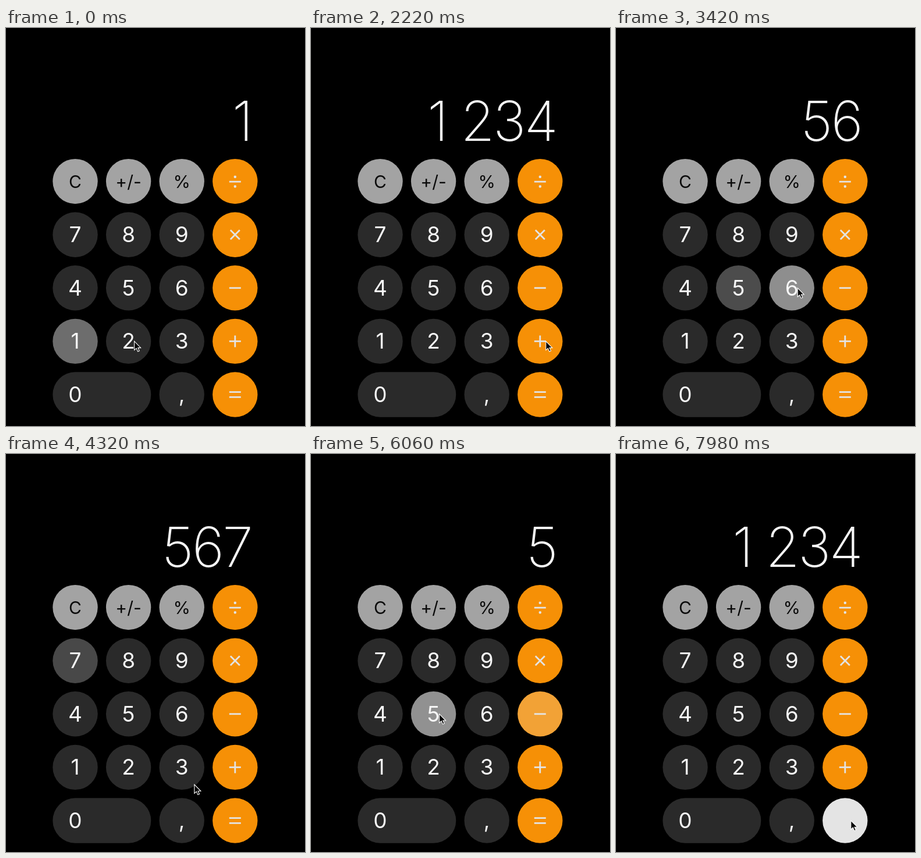
Animation, 514 px wide and 684 px high, one loop 8 s. Source, as an HTML page:

```html
<!DOCTYPE html>
<html lang="en">
<head>
<meta charset="utf-8">
<title>Calculator</title>
<style>
  html, body { margin: 0; width: 100%; height: 100%; overflow: hidden; background: #000; }
  svg { display: block; width: 514px; height: 684px; }
  text { font-family: Inter, Roboto, sans-serif; text-anchor: middle; }
  .digit { font-size: 37px; fill: #f6f6f6; }
  .tool { font-size: 30px; fill: #0a0a0a; }
  .icon { fill: none; stroke: #e4e4e4; stroke-width: 2.8; stroke-linejoin: round; }
  #display { font-size: 95px; font-weight: 200; letter-spacing: -2.8px; text-anchor: end; fill: #f6f6f6; }
</style>
</head>
<body>
<svg viewBox="0 0 514 684">
  <rect width="514" height="684"/>
  <text id="display" x="422" y="193.5"></text>
  <g id="keys"></g>
  <path id="cursor" d="M0 0V15.2L3.5 12L6 17.6L8.6 16.5L6.2 11.2H11Z" fill="#000" stroke="#fff" stroke-width="1.1"/>
</svg>
<script>
const LOOP = 8000, STEP = 60;
const HOLD = 50, FADE = 700;                       // key glow, ms
const DWELL = 150, MS_PER_PX = 1.6, BOW = 20;      // pointer travel
const LEFT = 119, TOP = 263.6, PITCH = 91.6, R = 38.7;

const LAYOUT = [['C', '+/-', '%', '÷'], [...'789×'], [...'456−'], [...'123+'], ['0', '', ',', '=']];
const ICONS = {
  '÷': 'M-10 .5H10M-.7-8.5h1.4v1.4h-1.4zM-.7 8.1h1.4v1.4h-1.4z',
  '×': 'M-8-8L8 8M8-8L-8 8',
  '−': 'M-10 0H10',
  '+': 'M-10 0H10M0-10V10',
  '=': 'M-10-4.3H10M-10 4.3H10'
};
const STYLES = {
  tool: { base: [163, 163, 163], lit: [217, 217, 217] },
  digit: { base: [42, 42, 42], lit: [146, 146, 146] },
  icon: { base: [246, 144, 6], lit: [228, 228, 228] }
};

const TIMES = [-300, 150, 600, 1080, 2450, 2900, 3340, 3770, 4900, 5460, 6000, 6300, 6880, 7950];
const presses = [...'1234+567=−567='].map((label, i) => ({ label, time: TIMES[i] }));

const display = document.getElementById('display');
const cursor = document.getElementById('cursor');
const keyGroup = document.getElementById('keys');
const keys = {};

const mix = (a, b, k) => a + (b - a) * k;
const clamp = k => Math.min(1, Math.max(0, k));
const ease = k => k * k * (3 - 2 * k);

function add(tag, attributes) {
  const node = document.createElementNS('http://www.w3.org/2000/svg', tag);
  for (const name in attributes) node.setAttribute(name, attributes[name]);
  return keyGroup.appendChild(node);
}

function addKey(label, col, row) {
  const x = LEFT + col * PITCH, y = TOP + row * PITCH;
  const type = col === 3 ? 'icon' : row === 0 ? 'tool' : 'digit';
  const width = 2 * R + (label === '0' ? PITCH : 0);
  const face = add('rect', { x: x - R, y: y - R, width, height: 2 * R, rx: R });
  if (type === 'icon') {
    add('path', { d: ICONS[label], class: type, transform: `translate(${x} ${y})` });
  } else {
    add('text', { x, y: y + (type === 'tool' ? 11 : 13), class: type }).textContent = label;
  }
  keys[label] = { x, y, face, ...STYLES[type] };
}

LAYOUT.forEach((labels, row) => labels.forEach((label, col) => label && addKey(label, col, row)));

// Works out what the display reads after each press.
function runCalculator() {
  let shown = 0, stored = 0, operator = '', fresh = true;
  for (const press of presses) {
    const { label } = press;
    if (label >= '0' && label <= '9') {
      shown = (fresh ? 0 : shown * 10) + Number(label);
      fresh = false;
    } else {
      if (label === '=') shown = operator === '+' ? stored + shown : stored - shown;
      else operator = label;
      stored = shown;
      fresh = true;
    }
    press.value = String(shown).replace(/\B(?=(\d{3})+$)/g, ' ');
  }
}

// The pointer rests on a pressed key, then glides to the next in a slight bow.
function pointerAt(t) {
  const i = presses.findLastIndex(press => press.time <= t);
  const next = presses[Math.min(i + 1, presses.length - 1)];
  const from = keys[presses[i].label], to = keys[next.label];
  const start = presses[i].time + DWELL;
  const distance = Math.hypot(to.x - from.x, to.y - from.y);
  const travel = Math.min(next.time - start, distance * MS_PER_PX);
  const k = travel > 0 ? clamp((t - start) / travel) : 0;
  return [mix(from.x, to.x, ease(k)) + 10, mix(from.y, to.y, ease(k)) + BOW * Math.sin(Math.PI * k)];
}

function render(t) {
  const glow = {};
  for (const { time, label, value } of presses) {
    if (time > t) break;
    display.textContent = value;
    glow[label] = clamp(1 - (t - time - HOLD) / FADE);
  }
  for (const label in keys) {
    const { face, base, lit } = keys[label];
    const color = base.map((channel, i) => Math.round(mix(channel, lit[i], glow[label] || 0)));
    face.setAttribute('fill', `rgb(${color})`);
  }
  cursor.setAttribute('transform', `translate(${pointerAt(t)})`);
}

runCalculator();
const origin = performance.now();
function tick() {
  const t = (performance.now() - origin) % LOOP;
  render(Math.floor(t / STEP) * STEP);
  requestAnimationFrame(tick);
}
tick();
</script>
</body>
</html>
```
